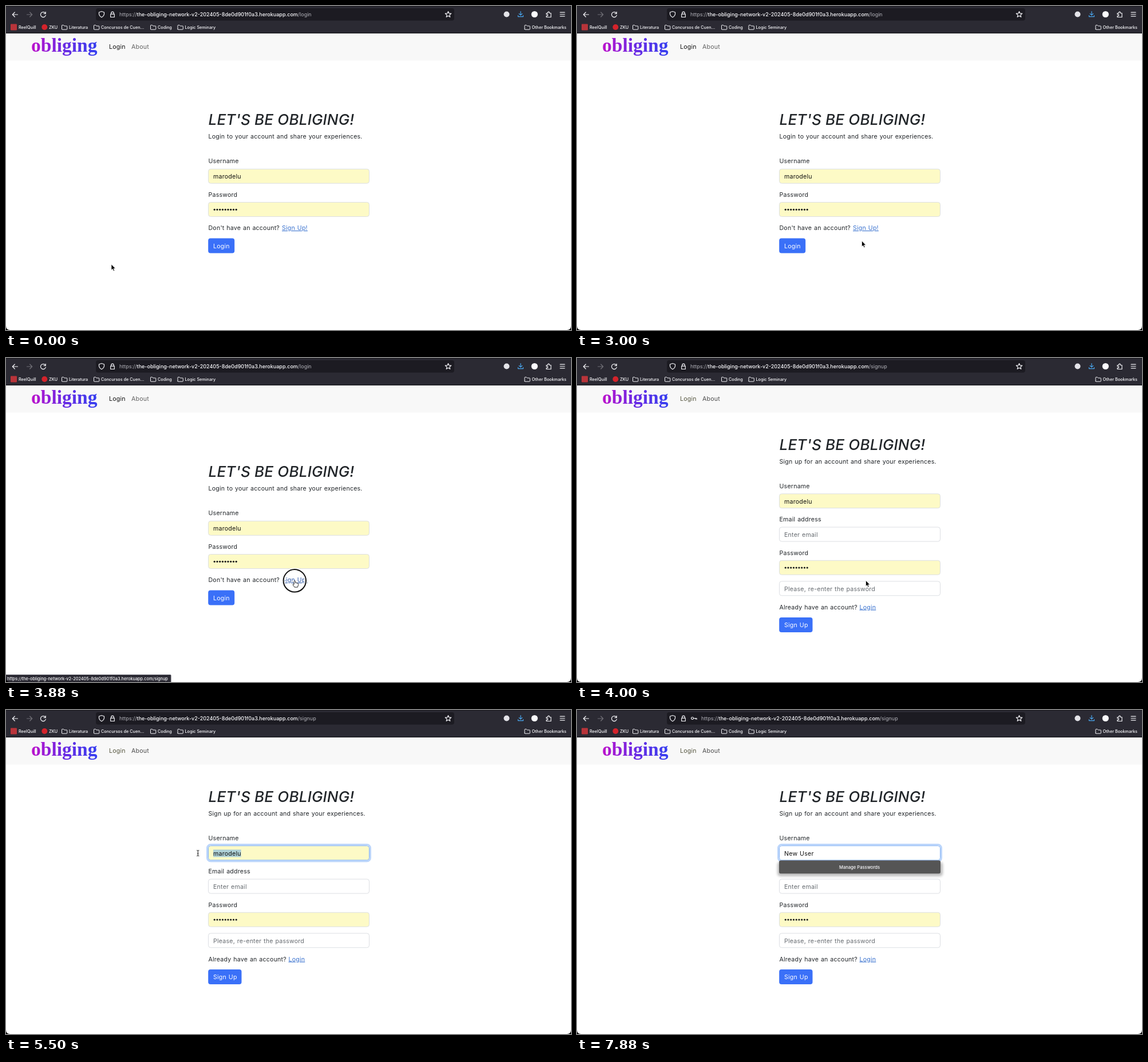
Animation of 987 by 567 pixels, one loop 8 s. Source, as an HTML page:

```html
<!DOCTYPE html>
<html lang="en">
<head>
<meta charset="utf-8">
<title>Sign up walkthrough</title>
<style>
  html, body { margin: 0; width: 100%; height: 100%; overflow: hidden; background: #fff; }
  svg { display: block; }
  text { font: 10.6px Inter, sans-serif; letter-spacing: .22px; word-spacing: .6px; fill: #212529; white-space: pre; }
  .title { font-size: 26px; font-style: italic; font-weight: 500; letter-spacing: .2px; word-spacing: 0; }
  .brand { font: bold 33.5px "Liberation Serif", serif; letter-spacing: 0; fill: url(#brandInk); }
  .url { font-size: 9px; letter-spacing: 0; fill: #b3b3ba; }
  .url .host { font-weight: 500; fill: #fbfbfe; }
  .mark, .status, .manage { font-size: 7.25px; font-weight: 500; letter-spacing: 0; word-spacing: 0; fill: #fbfbfe; }
  .status { font-size: 7.33px; }
  .manage { font-size: 7.6px; text-anchor: middle; }
  .value { fill: #111; }
  .hint { fill: #666b70; }
  .link { fill: #3a72cf; text-decoration: underline; }
  .link.hover { fill: #2a55a5; }
  .light { fill: #fff; }
  .icon { fill: none; stroke: #f3f3f7; stroke-width: 1.2; stroke-linecap: round; stroke-linejoin: round; }
</style>
</head>
<body>
<svg id="stage" width="987" height="567" viewBox="0 0 987 567"></svg>
<script>
const LOOP = 8000, STEP = 125;
const HOST = 'the-obliging-network-v2-202405-8de0d901f0a3.herokuapp.com';
const USER = 'marodelu';
const YELLOW = '#fdfac6';

const text = (x, y, s, cls = '', id = '') => `<text x="${x}" y="${y}" class="${cls}" id="${id}">${s}</text>`;
const rect = (x, y, w, h, r, fill, extra = '') =>
  `<rect x="${x}" y="${y}" width="${w}" height="${h}" rx="${r}" fill="${fill}" ${extra}/>`;
const circle = (x, y, r, fill) => `<circle cx="${x}" cy="${y}" r="${r}" fill="${fill}"/>`;
const icon = (x, y, d, extra = '') => `<path class="icon" transform="translate(${x} ${y})" d="${d}" ${extra}/>`;
const group = (id, body) => `<g id="${id}">${body}</g>`;

const field = (y, fill = '#fff', id = '') =>
  rect(353.5, y, 281, 25, 4, fill, `stroke="#dcdfe3" id="${id}"`);
const button = (y, w, label) => rect(353.2, y, w, 26, 4, '#3a70f8') + text(362, y + 17, label, 'light');
const dots = y => Array.from({ length: 9 }, (_, i) => circle(364.2 + i * 4.75, y, 1.6, '#16181a')).join('');
const folder = (x, label) =>
  icon(x, 33, 'M.5 7.5V1.2Q.5 .5 1.2 .5H3.6L5 2H9Q9.8 2 9.8 2.8V7.3Q9.8 8.2 9 8.2H1.2Q.5 8.2 .5 7.5Z',
    'style="stroke-width:1"') + text(x + 13, 40, label, 'mark');

const defs = `<defs>
  <linearGradient id="brandInk" gradientUnits="userSpaceOnUse" x1="44" y1="0" x2="160" y2="0">
    <stop offset="0" stop-color="#bd12cc"/><stop offset=".5" stop-color="#6a2ae4"/><stop offset="1" stop-color="#3540f0"/>
  </linearGradient>
  <filter id="blur" x="-10%" y="-50%" width="120%" height="200%"><feGaussianBlur stdDeviation="2"/></filter>
</defs>`;

const browser =
  rect(0, 0, 987, 47, 0, '#2b2a33') + rect(0, 0, 987, 1, 0, '#18171c') + rect(0, 47, 987, 1, 0, '#111115') +
  rect(157, 4, 626, 21.5, 4, '#1c1b22') +
  icon(16, 15, 'M4.5 0H-4.5M-.7-4-4.7 0-.7 4') +
  icon(41, 15, 'M-4.5 0H4.5M.7-4 4.7 0 .7 4', 'opacity=".35"') +
  icon(65, 15, 'M3.6-2.6A4.5 4.5 0 1 0 4.4 1M4.2-4.7V-1.5H1') +
  icon(167, 14.5, 'M0-5 4.5-3.5V-.5Q4 3.2 0 5.3-4 3.2-4.5-.5V-3.5Z') +
  icon(186, 15, 'M-3.3-.8H3.3V4.5H-3.3ZM-2.2-.8V-2.6A2.2 2.2 0 0 1 2.2-2.6V-.8') +
  group('key', icon(204, 14.5, 'M-.4 0A2 2 0 1 0-4.4 0 2 2 0 1 0-.4 0H5V2M2.8 0V1.5')) +
  `<text class="url" id="url" y="18">https://<tspan class="host">${HOST}</tspan><tspan id="path"></tspan></text>` +
  icon(772.5, 14.5, 'M0-5 1.5-1.6 5.2-1.3 2.4 1.1 3.3 4.8 0 2.8-3.3 4.8-2.4 1.1-5.2-1.3-1.5-1.6Z') +
  circle(874.5, 14.5, 5, '#e4e4e9') +
  icon(899, 14, 'M0-4.5V2M-2.8-.7 0 2.1 2.8-.7M-4.5 2.5V4.6H4.5V2.5', 'style="stroke:#4aa8f0"') +
  circle(923.3, 14.5, 5.6, '#fbfbfe') +
  icon(948, 15, 'M-4-2.5H-1.5V-3.5A1.4 1.4 0 0 1 1.3-3.5V-2.5H4V4.5H-4V2.4H-2.8A1.4 1.4 0 0 0-2.8-.4H-4Z') +
  icon(972, 14.5, 'M-4-3.3H4M-4 0H4M-4 3.3H4') +
  rect(8, 31.5, 11, 11, 1, '#b8343a') + text(22, 40, 'ReelQuill', 'mark') +
  circle(67.3, 37, 5, '#d4232b') + text(75, 40, 'ZKU', 'mark') +
  folder(97, 'Literatura') + folder(153, 'Concursos de Cuen...') + folder(252, 'Coding') +
  folder(299.5, 'Logic Seminary') + folder(905.5, 'Other Bookmarks');

const header = rect(0, 48, 987, 47.5, 0, '#f8f8f8') + text(44, 80, 'obliging', 'brand') +
  text(180, 75.3, 'Login', '', 'navLogin') + text(219, 75.3, 'About', '', 'navAbout');

const intro = (y, sentence) =>
  text(353.5, y, "LET'S BE OBLIGING!", 'title') + text(353.5, y + 24.3, sentence) + text(353.5, y + 67.3, 'Username');

const loginPage = group('loginPage',
  intro(208, 'Login to your account and share your experiences.') +
  field(285.3, YELLOW) + text(362, 302, USER, 'value') +
  text(353.5, 333.6, 'Password') + field(343.5, YELLOW) + dots(356.3) +
  text(353.5, 392, "Don't have an account?") + text(482, 392, 'Sign Up!', 'link', 'signLink') +
  button(406.5, 46, 'Login'));

const signupPage = group('signupPage',
  intro(160.5, 'Sign up for an account and share your experiences.') +
  rect(351.5, 235.5, 285, 29.3, 6, 'none', 'id="ring" stroke="#bcd6fb" stroke-width="3"') +
  field(237.7, YELLOW, 'nameField') + rect(362, 244.3, 45, 13, 0, '#aed0d6', 'id="selection"') +
  text(362, 254.6, USER, 'value', 'name') + rect(0, 244.5, 1, 12.5, 0, '#111', 'id="caret"') +
  text(353.5, 286.3, 'Email address') + field(296) + text(362, 312.8, 'Enter email', 'hint') +
  text(353.5, 344.5, 'Password') + field(354.3, YELLOW) + dots(367) +
  field(390.8) + text(362, 407.6, 'Please, re-enter the password', 'hint') +
  text(353.5, 439.5, 'Already have an account?') + text(493.5, 439.5, 'Login', 'link') +
  button(454, 58.3, 'Sign Up') +
  group('menu',
    rect(350, 266, 289, 25, 5, '#000', 'opacity=".25" filter="url(#blur)"') +
    rect(353, 263.3, 282, 23, 3, '#555') + text(493.5, 278, 'Manage Passwords', 'manage')));

const pointers =
  group('click', `<circle cx="504.3" cy="389.8" r="19.7" fill="none" stroke="#fff" stroke-width="5"/>
    <circle cx="504.3" cy="389.8" r="19.7" fill="none" stroke="#111" stroke-width="2"/>`) +
  group('arrow', '<path d="M0 0V10.2L2.3 8.1 3.9 11.8 5.6 11 4 7.5H7.2Z" fill="#000" stroke="#fff" stroke-width=".7"/>') +
  group('hand', `<path d="M-1.3 1Q0-.7 1.2 1V4Q2.2 3.2 3 4.3 4.1 3.7 4.7 4.8 6 4.5 6 6V8.3L4.8 11.6H-.4L-3.4 7.4Q-3.2 5.4-1.3 6.6Z"
    fill="#fff" stroke="#111" stroke-width=".9" stroke-linejoin="round"/>`) +
  group('beam', '<path d="M-2-5Q0-5 0-4 0-5 2-5M0-4V4M-2 5Q0 5 0 4 0 5 2 5M-1 .8H1" fill="none" stroke="#111"/>');

const status = group('status',
  rect(-1, 554.5, 289, 14, 1, '#2b2a33', 'stroke="#52515c"') +
  text(2, 563.8, `https://${HOST}/signup`, 'status'));

const corners = '<path d="M0 560V567H7Q0 567 0 560ZM987 560V567H980Q987 567 987 560Z" fill="#000"/>';

document.getElementById('stage').innerHTML =
  defs + rect(0, 0, 987, 567, 0, '#fff') + browser + header + loginPage + signupPage + status + pointers + corners;

const $ = id => document.getElementById(id);
const show = (id, on) => { $(id).style.display = on ? '' : 'none'; };

// time, x, y
const PATH = [
  [0, 184, 452], [125, 188, 451], [875, 400, 404], [1500, 533.5, 376], [1750, 541, 380],
  [2625, 500, 405], [3000, 497.5, 411], [3375, 504.5, 390], [4375, 504.5, 389],
  [4875, 409, 250.5], [5250, 331, 250.5], [5500, 335.3, 250.5], [LOOP, 335.3, 250.5]
];
const TYPED = [[0, USER], [6375, 'N'], [6500, 'Ne'], [6750, 'New'], [6875, 'New '],
  [7125, 'New U'], [7375, 'New Us'], [7500, 'New Use'], [7625, 'New User']];

function pointerAt(t) {
  const i = PATH.findIndex(p => p[0] > t);
  const [t0, x0, y0] = PATH[i - 1], [t1, x1, y1] = PATH[i];
  const u = (t - t0) / (t1 - t0), e = u * u * (3 - 2 * u);
  return [x0 + (x1 - x0) * e, y0 + (y1 - y0) * e];
}

function draw(t) {
  const [x, y] = pointerAt(t);
  const signup = t >= 4000, overLink = t >= 3375 && !signup;
  const focused = t >= 4875, typing = t >= 6375;

  show('loginPage', !signup);
  show('signupPage', signup);
  $('path').textContent = signup ? '/signup' : '/login';
  $('url').setAttribute('x', t >= 6500 ? 217 : 198);
  show('key', t >= 6500);
  $('navLogin').style.fill = signup ? '#55553f' : '#111';
  $('navAbout').style.fill = signup ? '#4c4c4c' : '#626262';

  $('signLink').classList.toggle('hover', overLink);
  show('status', overLink);
  show('click', t >= 3625 && !signup);

  show('ring', focused);
  $('nameField').setAttribute('stroke', focused ? '#86b4f5' : '#dcdfe3');
  $('nameField').setAttribute('fill', typing ? '#fff' : YELLOW);
  const name = $('name');
  name.textContent = TYPED.filter(k => k[0] <= t).pop()[1];
  const end = 362 + name.getComputedTextLength();
  const from = Math.min(end, Math.max(362, x));
  show('selection', focused && !typing);
  $('selection').setAttribute('x', from);
  $('selection').setAttribute('width', end - from);
  show('caret', typing && t < 7875);
  $('caret').setAttribute('x', end);
  show('menu', t >= 6500);

  const kind = typing ? '' : focused ? 'beam' : overLink ? 'hand' : 'arrow';
  for (const id of ['arrow', 'hand', 'beam']) {
    show(id, id === kind);
    $(id).setAttribute('transform', `translate(${x} ${y})`);
  }
}

function tick() {
  draw(Math.floor(performance.now() % LOOP / STEP) * STEP);
  requestAnimationFrame(tick);
}
tick();
</script>
</body>
</html>
```
